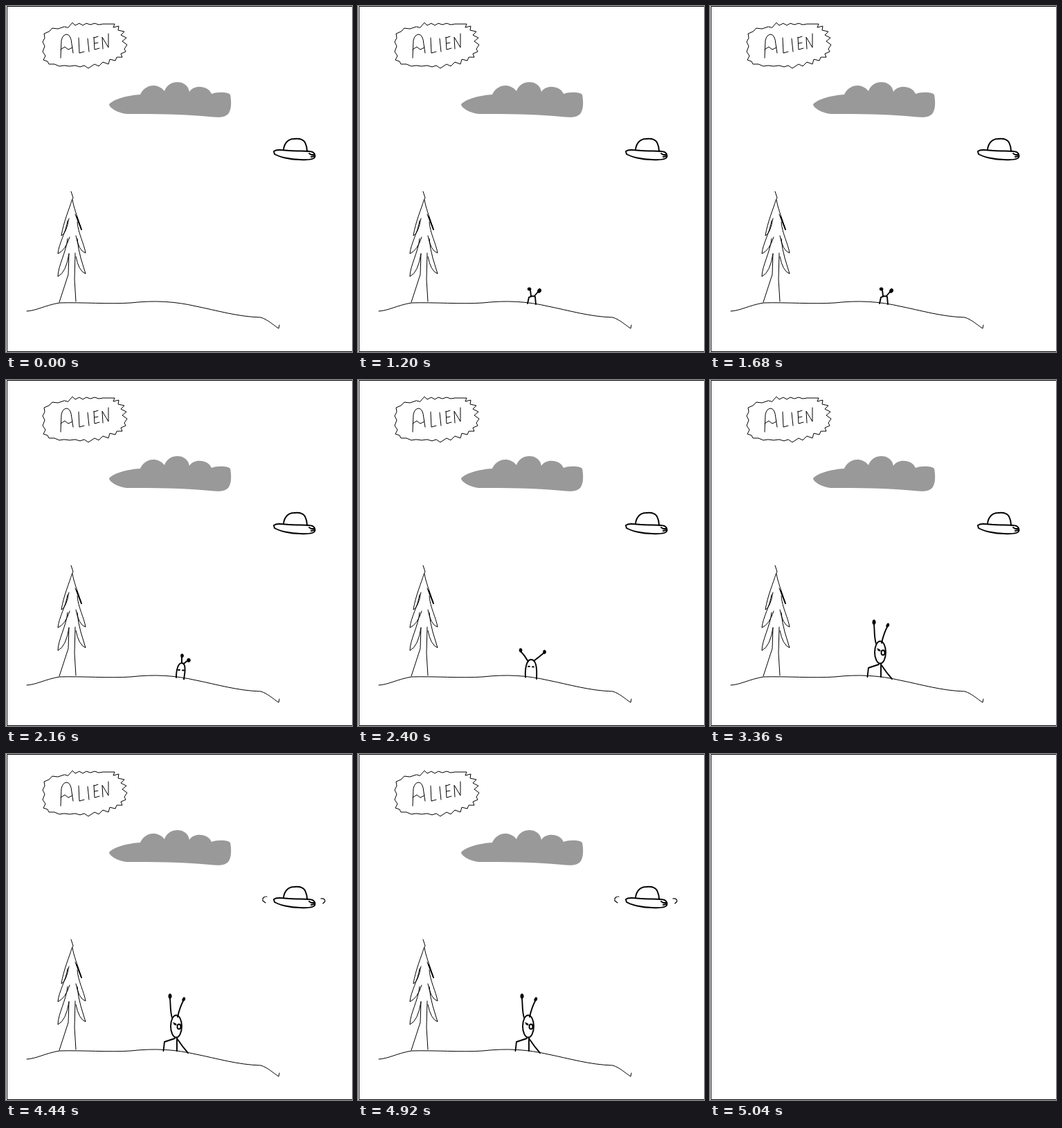
Animation, 500 px wide and 500 px high, one loop 5.16 s. Source, as an HTML page:

```html
<!DOCTYPE html>
<html lang="en">
<head>
<meta charset="utf-8">
<title>Alien</title>
<style>
html, body { margin: 0; height: 100%; overflow: hidden; background: #fff; }
svg { display: block; width: 100vw; height: 100vh; fill: none; stroke: #000; stroke-linecap: round; stroke-linejoin: round; }
.bold { stroke-width: 1.9; }
.fill { fill: #000; stroke-width: .6; }
</style>
</head>
<body>
<svg viewBox="0 0 500 500">
  <clipPath id="aboveHill"><path d="M200 0V430H240L275 437V0Z"/></clipPath>
  <path d="M500 .5H1.5V499.5H500" stroke-linecap="butt" stroke-linejoin="miter"/>

  <g id="scene">
    <!-- title sign -->
    <path d="M90 31L96 24L100 28L106 25L111 28L116 25L122 27L128 25L134 27L140 26L157 26L155 31L163 29L162 35L171 37L166 42L174 46L168 51L175 56L171 62L173 66L166 69L168 74L160 74L158 79L150 77L148 84L140 81L134 87L128 84L119 90L113 86L107 88L100 86L92 87L84 86L77 87L70 84L62 84L60 80L54 78L57 72L53 66L56 58L53 52L56 46L55 40L62 37L67 32L75 33L84 30Z"/>
    <path aria-label="ALIEN" d="M79 75L80 50Q82 41 88 41Q94 42 95 55L97 68M79 63L85 59L90 63L96 60M105 46L106 68L113 66M118 47L120 66M127 45L128 63L135 61M127 46L133 44M128 54L133 53M140 62L139 45L148 60V40"/>

    <path fill="#999" stroke="none" d="M149 142C155 135 175 129 194 128C200 114 218 110 229 123C234 106 262 105 265 124C272 113 292 115 297 127C305 124 320 124 324 128C326 138 326 150 321 156C315 162 305 161 295 160C255 156 215 156 175 156C162 155 149 147 149 142Z"/>

    <!-- tree and hill -->
    <path d="M94 268L97 277L95 281C92 292 83 312 80 332Q87 329 91 307M96 280C98 292 103 304 109 323L100 301M89 310C87 326 76 344 75 358Q86 353 92 334M103 312C104 328 113 344 115 357Q105 354 101 332M89 336C87 356 75 376 75 391Q87 385 91 358M103 336Q104 350 108 364L115 387Q105 383 101 362M91 358L90 388L77 428M100 357L99 395L101 427"/>
    <path class="bold" d="M102 304L109 323"/>
    <path d="M30 441C45 440 55 433 77 429C110 428 150 431 180 429C215 425 245 427 275 434C305 440 335 449 368 450C378 453 385 460 394 466L395 461"/>

    <!-- saucer -->
    <path class="bold" d="M401 208C402 198 408 192 416 192C424 191 429 192 432 197Q435 203 435 209M387 210C391 207 398 208 410 209C425 210 438 209 443 211Q448 214 446 219Q443 223 425 222C410 222 395 218 388 214ZM438 213L441 215H446M441 218L446 217"/>
    <path id="marks" stroke-width="1.2" d="M377 206Q370 206 371 212L375 215M455 209Q461 208 461 213L458 216"/>
    <path id="longRay" class="bold" d="M400 220L317 324"/>
    <path id="shortRay" class="bold" d="M385 240L322 292"/>

    <!-- alien poses -->
    <g clip-path="url(#aboveHill)" class="bold">
      <g id="peek">
        <path d="M245 430L247 421Q252 418 256 420L257 431M250 419L249 410M255 419L261 412"/>
        <ellipse class="fill" cx="247.5" cy="409" rx="2.5" ry="2.2"/>
        <ellipse class="fill" cx="262" cy="411.5" rx="2.4" ry="3.2" transform="rotate(30 262 411.5)"/>
      </g>
      <g id="rise">
        <path d="M246 430C246 418 249 409 254 409C258 409 259 414 258.500 422L257 433M254 409V400M258 409L263 405M249 419H251M255 419.500H257"/>
        <ellipse class="fill" cx="254.500" cy="398.500" rx="2" ry="2.800"/>
        <ellipse class="fill" cx="264" cy="405" rx="2.400" ry="2.800"/>
      </g>
      <g id="spread">
        <path d="M242 430C241 416 244 404 250 404C257 404 259 414 258 432M246 407Q241 398 235 392M254 406Q262 400 269 394M246 414H248M252 414.500H254"/>
        <ellipse class="fill" cx="235" cy="390.500" rx="2" ry="2.800"/>
        <ellipse class="fill" cx="269.500" cy="393" rx="2" ry="2.800"/>
      </g>
    </g>
    <g id="stand" class="bold">
      <path d="M240 381C237 372 238 362 237 353M248 380Q251 366 257 355M244 411L229 416L227.500 429M247 410V429M247 411Q255 423 263 432"/>
      <ellipse cx="246" cy="393.500" rx="8" ry="16"/>
      <ellipse cx="250" cy="394" rx="2.500" ry="3.500"/>
      <path class="fill" d="M242 388L246 390V392L243 391Z"/>
      <ellipse class="fill" cx="237" cy="350" rx="2.200" ry="3.500"/>
      <ellipse class="fill" cx="257" cy="354.500" rx="1.800" ry="3" transform="rotate(25 257 354)"/>
    </g>
  </g>
</svg>
<script>
const STEP = 120, LOOP = 5160;
const peekDrop = [0, 3, 6, 3, 0];
const riseDrop = [9, 6, 3, 0, -3];
const el = id => document.getElementById(id);
const show = (id, on) => el(id).setAttribute('display', on ? 'inline' : 'none');
const drop = (id, y) => el(id).setAttribute('transform', `translate(0 ${y || 0})`);

function draw(now) {
  const t = now % LOOP;
  const within = (from, to) => t >= from && t < to;
  const stepFrom = start => Math.floor((t - start) / STEP);

  show('scene', t < 5040);
  show('peek', within(1200, 1800));
  drop('peek', peekDrop[stepFrom(1200)]);
  show('rise', within(1800, 2400));
  drop('rise', riseDrop[stepFrom(1800)]);
  show('spread', within(2400, 2880));
  show('stand', t >= 2880);
  show('longRay', within(3240, 3360));
  show('shortRay', within(3840, 4440));
  show('marks', within(4440, 4560) || t >= 4920);
}

const start = performance.now();
function tick() {
  draw(performance.now() - start);
  requestAnimationFrame(tick);
}
tick();
</script>
</body>
</html>
```
